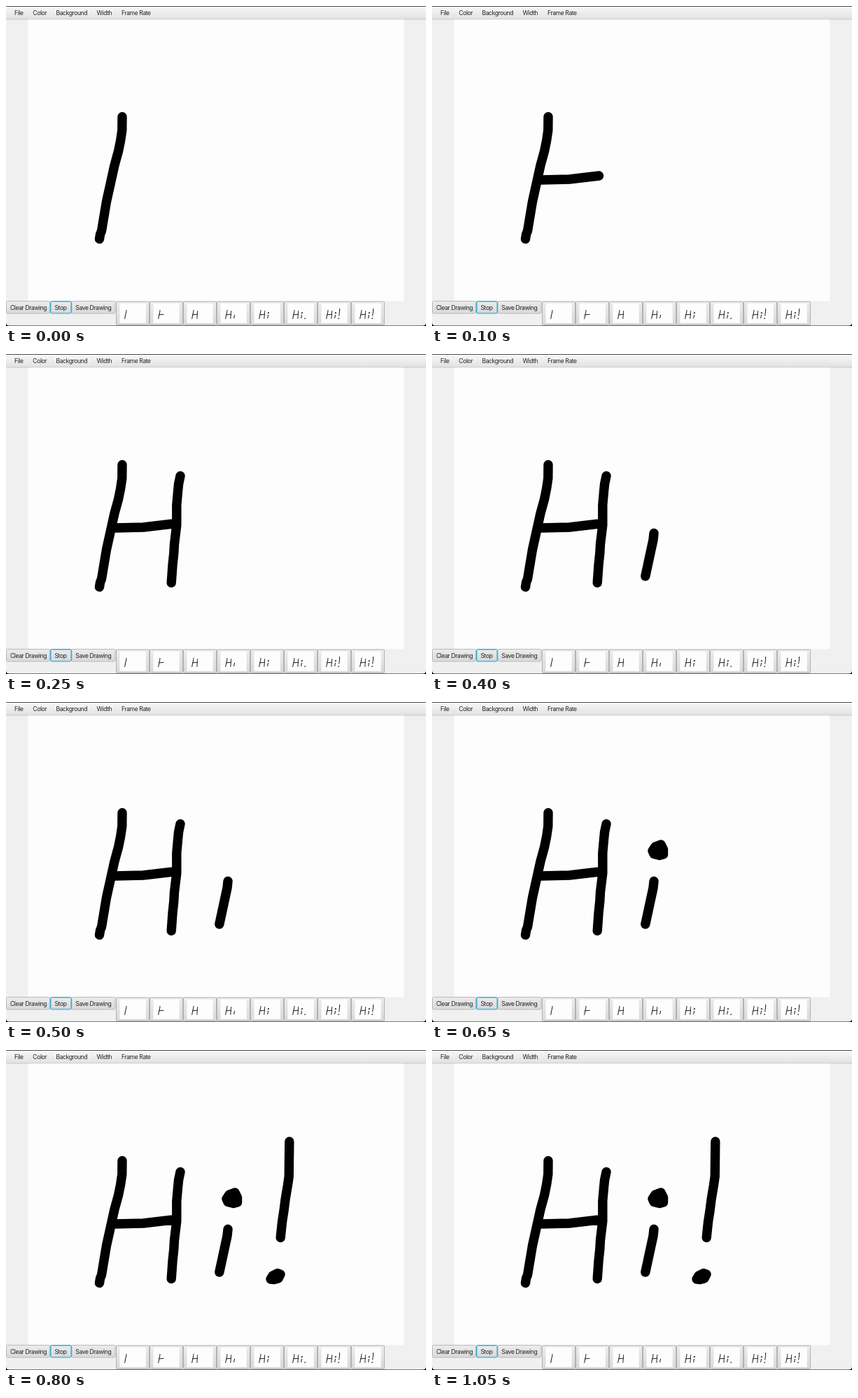
Recreate the animation shown at these times as an HTML page. Size 600 by 458 pixels, loop 1.1 s.

```html
<!DOCTYPE html>
<html lang="en">
<head>
<meta charset="utf-8">
<title>Drawing animation</title>
<style>
  html, body { margin: 0; width: 100%; height: 100%; overflow: hidden; background: #000; }
  svg { display: block; width: 100vw; height: 100vh; }
  text { font: 8.6px Inter, Roboto, sans-serif; letter-spacing: -0.42px; fill: #222; }
  .ink { fill: none; stroke: #000; stroke-width: 13.4; stroke-linecap: round; stroke-linejoin: round; }
</style>
</head>
<body>
<svg id="stage" viewBox="0 0 600 458">
  <defs>
    <linearGradient id="bar" x2="0" y2="1">
      <stop offset="0" stop-color="#f8f8f8"/><stop offset="1" stop-color="#e1e1e1"/>
    </linearGradient>
    <linearGradient id="button" x2="0" y2="1">
      <stop offset="0" stop-color="#ececec"/><stop offset="1" stop-color="#d9d9d9"/>
    </linearGradient>
  </defs>
  <path d="M0 1H600V453Q600 457.5 595 457.5H5Q0 457.5 0 453Z" fill="#f0f0f0"/>
  <rect y="1" width="600" height="18" fill="url(#bar)"/>
  <rect y="0" width="600" height="1" fill="#4a4a4a"/>
  <rect y="18.5" width="600" height="1" fill="#c8c8c8"/>
  <rect x="31.5" y="19.5" width="537" height="403" fill="#fdfdfd"/>
  <g id="controls"></g>
  <g id="drawing"></g>
</svg>
<script>
const LOOP = 1100;
const STARTS = [0, 100, 250, 400, 550, 700, 800, 942];

// Each stroke is added on top of the previous ones.
const STROKES = [
  'M166 158.5L165.8 178Q164 193 160.5 208L155 228L143.5 280L136.5 322L134.5 327L133.5 333.5',
  'M154 249L196 248L213 246L238.5 243',
  'M249 174.5Q246 186 245.5 197L243.8 216V245L240.5 272L239.8 285L238 302L236.2 327.5',
  'M317 256.5L316 266L304.8 318',
  'M315 213L319 207L327 204L330.5 211V218L325 219.5L317 217.5Z M321 212H326',
  'M378 328L381 323L388 319.5L392 321L389 327L383 328.5Z',
  'M404.8 131L404.2 181L402.5 193L399 214L397 230L394.5 246L392.2 268.5'
];

const controls = document.getElementById('controls');
const drawing = document.getElementById('drawing');

function add(parent, tag, attrs, content) {
  const node = document.createElementNS('http://www.w3.org/2000/svg', tag);
  for (const name in attrs) node.setAttribute(name, attrs[name]);
  if (content) node.textContent = content;
  parent.appendChild(node);
  return node;
}

const inkUpTo = index => STROKES.slice(0, index + 1).join('');
const label = (x, y, content) => add(controls, 'text', { x, y }, content);

function box(x, y, width, height, fill, stroke, rx = 0) {
  add(controls, 'rect', { x, y, width, height, fill, stroke, rx });
}

function button(x, width, textX, content, focused) {
  box(x + .5, 422.5, width - 1, 17.5, 'url(#button)', focused ? '#2aa5d4' : '#b9b9b9', 2);
  if (focused) box(x + 1.3, 423.3, width - 2.6, 15.9, 'none', '#70c3e2', 1);
  label(textX, 434.7, content);
}

function thumbnail(index) {
  const x = 157 + index * 48;
  box(x + .5, 423, 47, 33.5, 'url(#button)', '#b2b2b2', 1);
  box(x + 5.5, 425.7, 37.2, 28.2, '#fdfdfd', 'none');
  add(controls, 'path', {
    class: 'ink',
    d: inkUpTo(index),
    transform: `translate(${x + 5.5} 425.7) scale(.07) translate(-31.5 -19.5)`
  });
}

[[12, 'File'], [38.3, 'Color'], [71.5, 'Background'], [129.5, 'Width'], [165, 'Frame Rate']]
  .forEach(([x, name]) => label(x, 13, name));
button(0, 63, 6, 'Clear Drawing');
button(93.5, 63, 99.3, 'Save Drawing');
button(63, 31, 69.5, 'Stop', true);
STARTS.forEach((_, index) => thumbnail(index));

const ink = add(drawing, 'path', { class: 'ink' });

function render(time) {
  const phase = time % LOOP;
  const index = STARTS.filter(start => start <= phase).length - 1;
  ink.setAttribute('d', inkUpTo(index));
}

const origin = performance.now();
function tick() {
  render(performance.now() - origin);
  requestAnimationFrame(tick);
}
tick();
</script>
</body>
</html>
```
